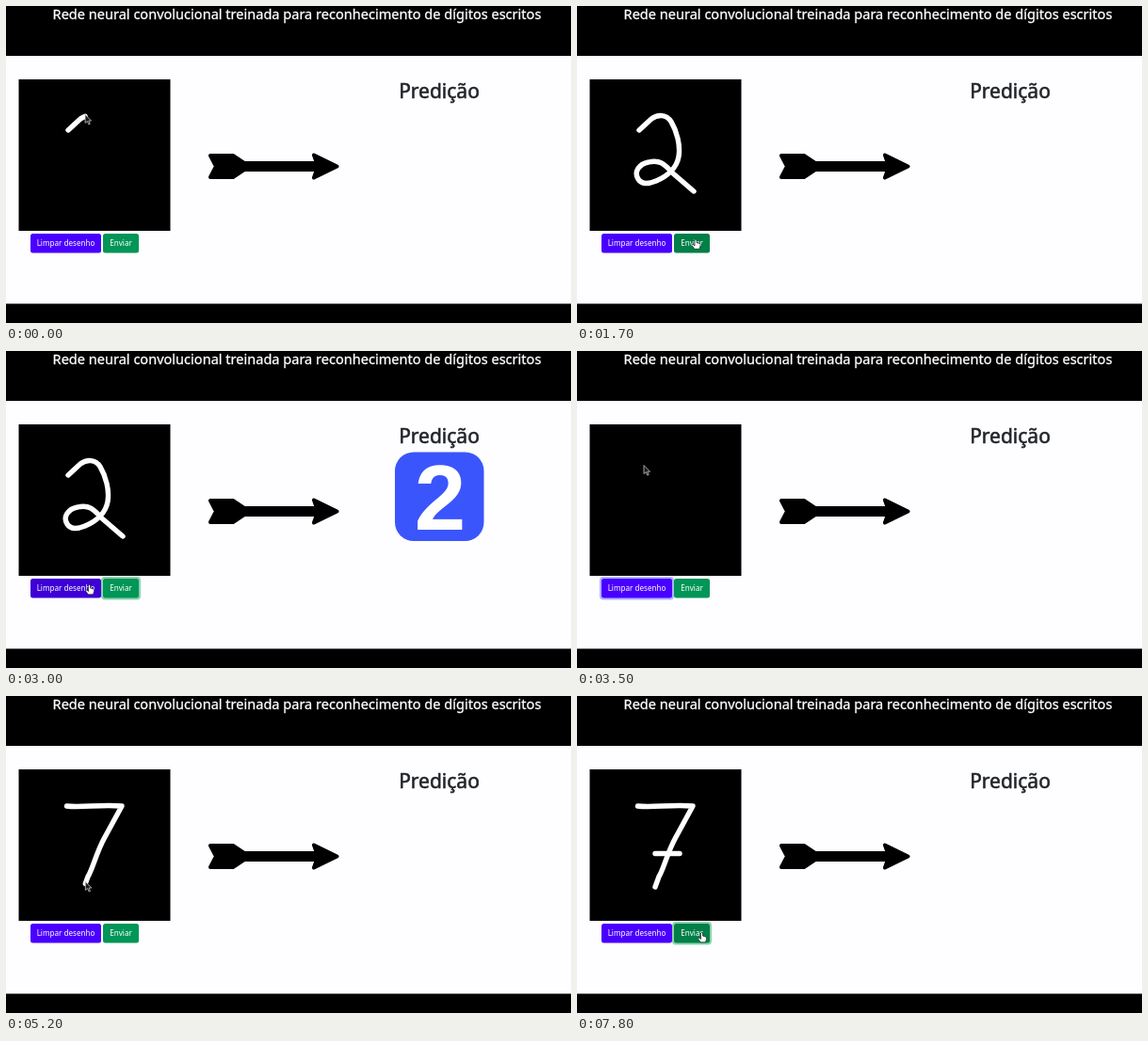
An HTML page for the animation above (8 s loop, 600 by 337 pixels).

```html
<!DOCTYPE html>
<html lang="pt">
<head>
<meta charset="utf-8">
<title>Reconhecimento de dígitos</title>
<style>
  html, body { margin: 0; width: 100%; height: 100%; overflow: hidden; background: #000; }
  svg { display: block; width: 600px; height: 337px; }
  text { font-family: "Noto Sans", "Open Sans", sans-serif; text-anchor: middle; }
  .title { font-size: 14.55px; fill: #fff; stroke: #fff; stroke-width: .3; }
  .heading { font-size: 21px; fill: #212529; stroke: #212529; stroke-width: .55; }
  .label { font-size: 8.1px; fill: #fff; }
  .digit { font: bold 98px "Liberation Sans", Arial, sans-serif; fill: #fff; }
  .ink { fill: none; stroke: #fff; stroke-width: 5.4; stroke-linecap: round; stroke-linejoin: round; }
  .arrow { stroke: #000; stroke-width: 4; stroke-linejoin: round; }
</style>
</head>
<body>
<svg viewBox="0 0 600 337">
  <rect width="600" height="337"/>
  <rect y="53" width="600" height="263.5" fill="#fefdff"/>
  <text class="title" x="309" y="14">Rede neural convolucional treinada para reconhecimento de dígitos escritos</text>
  <text class="heading" x="460" y="98">Predição</text>

  <path class="arrow" d="M217 159H241L253 167H330L327 158.500L351.500 170.500L327 182.500L330 174H253L241 182H217L223 170.500Z"/>

  <g id="result">
    <rect x="413" y="107.500" width="94.500" height="94.500" rx="20" fill="#3b55fc"/>
    <text class="digit" x="461" y="190">2</text>
  </g>

  <rect x="13.500" y="78" width="161" height="161"/>
  <path class="ink" id="two" d="M66 132L79 120C86 115 95 115 100 123C106 133 110 148 108 160C106 172 96 181 84 186C74 190 68 189 65 184C60 176 66 168 76 166C88 163 93 168 102 178C110 185 117 191 124 197"/>
  <path class="ink" id="seven" d="M64.500 117C80 119 100 115 123 117L105 150C96 166 92 184 87 192L83 203"/>
  <path class="ink" id="bar" d="M83 167.500H109"/>

  <g id="clear">
    <rect class="ring" x="24" y="240" width="79" height="24.500" rx="4" fill="#aeb2ff"/>
    <rect class="face" x="26" y="242" width="75" height="20.500" rx="2.500"/>
    <text class="label" x="63.500" y="255.300">Limpar desenho</text>
  </g>
  <g id="send">
    <rect class="ring" x="101" y="240" width="42" height="24.500" rx="4" fill="#8fd3ad"/>
    <rect class="face" x="103" y="242" width="38" height="20.500" rx="2.500"/>
    <text class="label" x="122" y="255.300">Enviar</text>
  </g>

  <path id="pointer" d="M0 0V9L2.200 7.200L3.800 10.600L5.200 10L3.700 6.700H6.500Z" fill="#1c1c1c" stroke="#c8c8c8" stroke-width=".8"/>
  <path id="hand" d="M-1 0.500Q0 -.5 1 .5V3.600L4.500 4.500Q5.300 5 5 7L4 10.300H-1.200L-4 6.500Q-4 5 -2.500 5.700L-1 7Z" fill="#fff" stroke="#222" stroke-width=".7"/>
</svg>
<script>
const LOOP = 8000, STEP = 100;
const $ = id => document.getElementById(id);

// Pen strokes: [time, share of the path drawn]
const strokes = [
  { el: $("two"), keys: [[0, .105], [900, .74], [1200, 1]], until: 3200 },
  { el: $("seven"), keys: [[3700, 0], [4200, .375], [4300, .375], [5200, .975], [5300, 1]], until: LOOP },
  { el: $("bar"), keys: [[5700, 0], [6000, 1]], until: LOOP }
];
// Free pointer moves: [time, x, y]
const moves = [
  [1200, 124, 197], [1600, 132, 251], [1700, 126, 248], [2600, 126, 248],
  [3000, 88.500, 248.500], [3200, 88, 248.500], [3500, 71, 121.500], [3700, 64, 117],
  [5300, 83, 203], [5700, 83, 167], [6000, 109, 167], [6100, 110, 168],
  [6400, 135, 250], [6500, 134.500, 251.500], [6700, 134.500, 251.500], [7000, 118, 249],
  [7400, 138, 251], [7600, 138, 251], [7800, 132.500, 251.500]
];
const buttons = [
  { el: $("clear"), x0: 26, x1: 101, color: "#4900ff", hover: "#3d00d6", focus: [[3200, 3800]] },
  { el: $("send"), x0: 103, x1: 141, color: "#009657", hover: "#007f48", focus: [[2000, 3200], [6800, LOOP]] }
];

for (const s of strokes) {
  s.length = s.el.getTotalLength();
  s.start = s.keys[0][0];
  s.end = s.keys[s.keys.length - 1][0];
}

const show = (el, on) => el.setAttribute("visibility", on ? "visible" : "hidden");
const within = (t, [a, b]) => t >= a && t < b;

function sample(keys, t) {
  if (t <= keys[0][0]) return keys[0].slice(1);
  const i = keys.findIndex(k => k[0] >= t);
  if (i < 0) return keys[keys.length - 1].slice(1);
  const a = keys[i - 1], b = keys[i], u = (t - a[0]) / (b[0] - a[0]);
  return a.slice(1).map((v, n) => v + (b[n + 1] - v) * u);
}

function render(t) {
  let [x, y] = sample(moves, t);
  for (const s of strokes) {
    const done = sample(s.keys, t)[0] * s.length;
    show(s.el, done > 0 && within(t, [s.start, s.until]));
    s.el.style.strokeDasharray = `${done} ${s.length + 10}`;
    if (t >= s.start && t <= s.end) {
      const p = s.el.getPointAtLength(done);
      x = p.x;
      y = p.y - 2;
    }
  }
  let over = false;
  for (const b of buttons) {
    const hit = y > 242 && y < 262 && x >= b.x0 && x <= b.x1;
    over = over || hit;
    b.el.querySelector(".face").setAttribute("fill", hit ? b.hover : b.color);
    show(b.el.querySelector(".ring"), b.focus.some(f => within(t, f)));
  }
  show($("result"), within(t, [2400, 3200]));
  show($("hand"), over);
  show($("pointer"), !over);
  $(over ? "hand" : "pointer").setAttribute("transform", `translate(${x} ${y})`);
}

const origin = performance.now();
function tick() {
  const t = (performance.now() - origin) % LOOP;
  render(Math.floor(t / STEP) * STEP);
  requestAnimationFrame(tick);
}
render(0);
requestAnimationFrame(tick);
</script>
</body>
</html>
```
